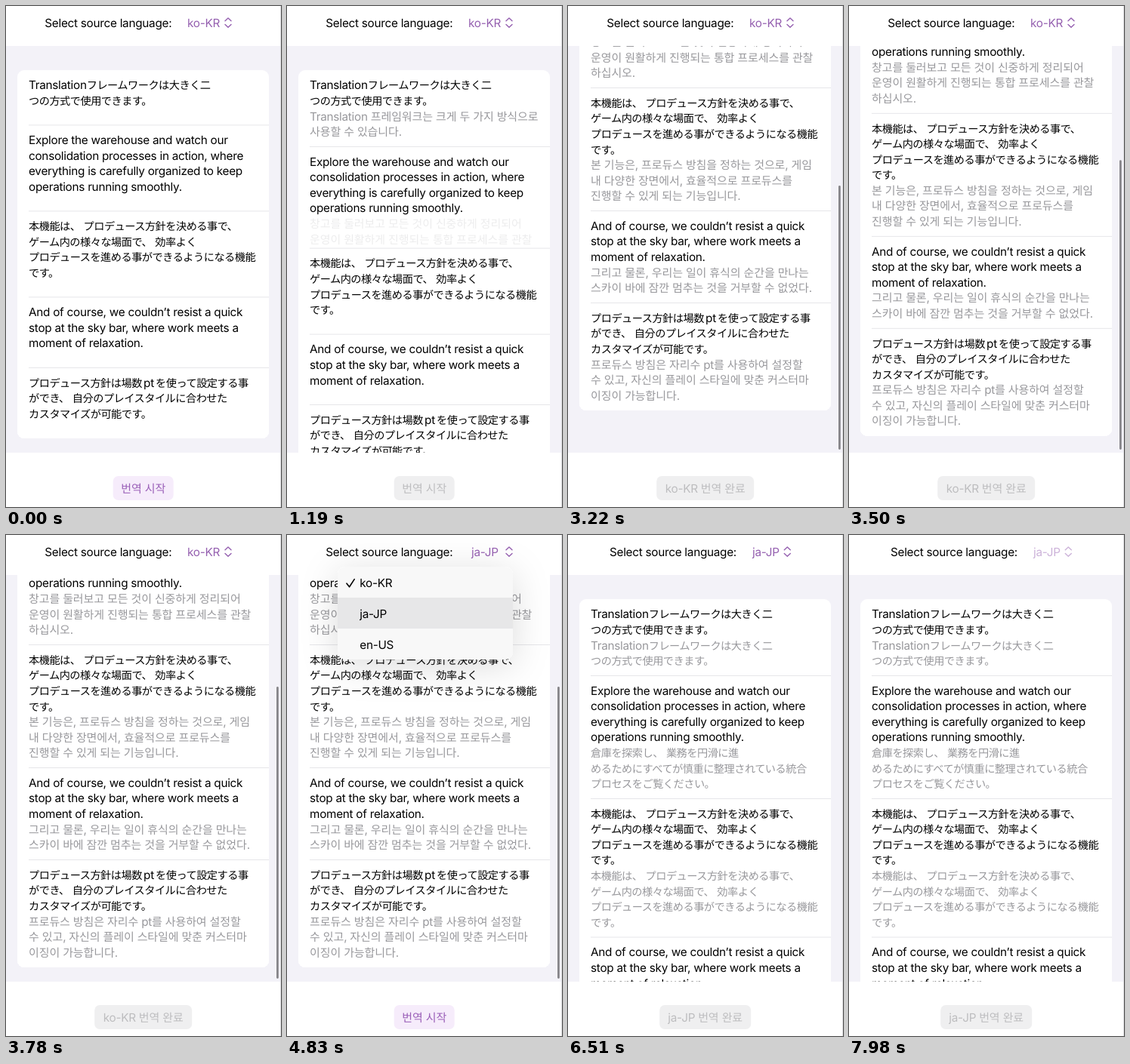
Animation of 364x664 px, one loop 8 s. Source, as an HTML page:

```html
<!DOCTYPE html>
<html lang="ko">
<head>
<meta charset="utf-8">
<title>Translation list</title>
<style>
html, body { margin: 0; width: 100%; height: 100%; overflow: hidden; background: #fff; }
svg { display: block; width: 100vw; height: 100vh; }
text { white-space: pre; text-rendering: geometricPrecision; }
.la { font: 400 15.3px Inter, sans-serif; letter-spacing: -.27px; }
.jp { font: 400 14.2px "Noto Sans CJK JP", sans-serif; letter-spacing: -.5px; }
.kr { font: 400 15px "Noto Sans CJK KR", sans-serif; letter-spacing: -.1px; }
.mid { text-anchor: middle; }
</style>
</head>
<body>
<svg id="stage" viewBox="0 0 364 664">
  <defs>
    <clipPath id="view"><rect y="53" width="364" height="539"/></clipPath>
    <clipPath id="round"><rect id="mask" x="15" width="333" rx="9"/></clipPath>
    <filter id="shade" x="-50%" y="-80%" width="200%" height="260%">
      <feDropShadow dx="0" dy="8" stdDeviation="24" flood-color="#000" flood-opacity=".14"/>
    </filter>
  </defs>
  <rect width="364" height="664" fill="#fff"/>
  <g clip-path="url(#view)">
    <rect y="53" width="364" height="539" fill="#f3f2f8"/>
    <g id="card"><g id="rows" clip-path="url(#round)"></g></g>
    <rect id="bar" x="358" width="2.8" rx="1.4" fill="#000"/>
  </g>
  <g id="button"></g>
  <rect x="363" width="1" height="664" fill="#dcdcde"/>
  <g id="menu"></g>
  <g id="head"></g>
</svg>
<script>
const LINE = 20.55, PAD = 19.2, GAP = 12.6, TOP = 85, END = 573;
const PURPLE = '#9560b0', GREY = '#98989c';
const $ = id => document.getElementById(id);

function el(parent, tag, attrs = {}) {
  const node = document.createElementNS('http://www.w3.org/2000/svg', tag);
  for (const k in attrs) node.setAttribute(k, attrs[k]);
  parent.append(node);
  return node;
}

// One text line, split into runs by script; "|" is a small gap.
function label(parent, x, y, str, fill, cls = '') {
  const node = el(parent, 'text', { x, y, fill, class: cls });
  let dx = 0;
  for (const run of str.match(/\||[ -{}~’]+|[가-힣]+|[^ -~’가-힣]+/g)) {
    if (run === '|') { dx = 2.2; continue; }
    const kind = /[ -~’]/.test(run) ? 'la' : /[가-힣]/.test(run) ? 'kr' : 'jp';
    const span = el(node, 'tspan', { class: kind });
    if (dx) span.setAttribute('dx', dx);
    span.textContent = run;
    dx = 0;
  }
  return node;
}

const clamp = x => Math.min(1, Math.max(0, x));
const ramp = (t, a, b) => clamp((t - a) / (b - a));
const smooth = (t, a, b) => { const p = ramp(t, a, b); return p * p * (3 - 2 * p); };
const mix = (a, b, p) => a + (b - a) * p;
const show = (node, on) => node.setAttribute('opacity', +on);

const intro = ['Translationフレームワークは大きく二', 'つの方式で使用できます。'];
const feature = [
  '本機能は、 プロデュース方針を決める事で、', 'ゲーム内の様々な場面で、 効率よく',
  'プロデュースを進める事ができるようになる機能', 'です。'];
const policy = [
  'プロデュース方針は場数|pt|を使って設定する事', 'ができ、 自分のプレイスタイルに合わせた',
  'カスタマイズが可能です。'];

// ko, ja: start and end of each reveal
const items = [
  { src: intro,
    kor: ['Translation 프레임워크는 크게 두 가지 방식으로', '사용할 수 있습니다.'],
    jpn: intro, ko: [690, 1010], ja: [6050, 6280] },
  { src: ['Explore the warehouse and watch our', 'consolidation processes in action, where',
      'everything is carefully organized to keep', 'operations running smoothly.'],
    kor: ['창고를 둘러보고 모든 것이 신중하게 정리되어', '운영이 원활하게 진행되는 통합 프로세스를 관찰', '하십시오.'],
    jpn: ['倉庫を探索し、 業務を円滑に進', 'めるためにすべてが慎重に整理されている統合', 'プロセスをご覧ください。'],
    ko: [1020, 1400], ja: [6110, 6350] },
  { src: feature,
    kor: ['본 기능은, 프로듀스 방침을 정하는 것으로, 게임', '내 다양한 장면에서, 효율적으로 프로듀스를', '진행할 수 있게 되는 기능입니다.'],
    jpn: feature, ko: [1440, 1800], ja: [6180, 6500] },
  { src: ['And of course, we couldn’t resist a quick', 'stop at the sky bar, where work meets a', 'moment of relaxation.'],
    kor: ['그리고 물론, 우리는 일이 휴식의 순간을 만나는', '스카이 바에 잠깐 멈추는 것을 거부할 수 없었다.'],
    jpn: ['もちろん、 仕事と休息が出会う', 'スカイバーにも立ち寄りました。'],
    ko: [1780, 2230], ja: [6240, 6500] },
  { src: policy,
    kor: ['프로듀스 방침은 자리수 pt를 사용하여 설정할', '수 있고, 자신의 플레이 스타일에 맞춘 커스터마', '이징이 가능합니다.'],
    jpn: policy, ko: [1900, 2240], ja: [6260, 6500] }
];

function block(parent, lines, first, fill) {
  const g = el(parent, 'g');
  lines.forEach((s, i) => label(g, 30, 25.4 + (first + i) * LINE, s, fill));
  return g;
}

items.forEach((it, i) => {
  it.g = el($('rows'), 'g');
  it.back = el(it.g, 'rect', { x: 15, width: 333, height: 900, fill: '#fff' });
  if (i) el(it.g, 'rect', { x: 30, y: -.4, width: 318, height: .8, fill: '#e0e0e4' });
  const n = it.src.length;
  block(it.g, it.src, 0, '#000');
  it.korText = block(it.g, it.kor, n, GREY);
  it.jpnText = block(it.g, it.jpn, n, GREY);
});

// Bottom button in its four looks
function button(str, w, fill, ink) {
  const g = el($('button'), 'g');
  el(g, 'rect', { x: 181.7 - w / 2, y: 623, width: w, height: 32, rx: 7, fill });
  label(g, 181.7, 644.6, str, ink, 'mid');
  return g;
}
const buttons = {
  ready: button('번역 시작', 80, '#f6ecfb', '#9a5fb8'),
  busy: button('번역 시작', 80, '#efeff0', '#bdbdbf'),
  ko: button('ko-KR 번역 완료', 129, '#efeff0', '#bdbdbf'),
  ja: button('ja-JP 번역 완료', 121, '#efeff0', '#bdbdbf')
};

// Header
const title = el($('head'), 'g');
label(title, 51.3, 27.8, 'Select source language:', '#000');
const picker = el($('head'), 'g');
const pickKo = label(picker, 240, 27.8, 'ko-KR', PURPLE);
const pickJa = label(picker, 244, 27.8, 'ja-JP', PURPLE);
const arrows = el(picker, 'path', {
  d: 'M290 19.8l4-3.8 4 3.8M290 24.4l4 3.8 4-3.8', fill: 'none', stroke: PURPLE,
  'stroke-width': 1.4, 'stroke-linecap': 'round', 'stroke-linejoin': 'round'
});

// Pop-up menu
const menu = $('menu');
el(menu, 'rect', { x: 67, y: 42, width: 232, height: 123, rx: 11, fill: '#f8f8f8', filter: 'url(#shade)' });
const picked = el(menu, 'rect', { x: 67, y: 83, width: 232, height: 41, fill: '#e7e7e8' });
['ko-KR', 'ja-JP', 'en-US'].forEach((s, i) => label(menu, 96.3, 69 + i * 41, s, '#000'));
el(menu, 'path', {
  d: 'M79 64.2l3.6 4.6 6.6-10.2', fill: 'none', stroke: '#000',
  'stroke-width': 1.6, 'stroke-linecap': 'round', 'stroke-linejoin': 'round'
});

function scrollAt(t, max) {
  if (t < 2900 || t > 6060) return 0;
  if (t < 3220) {
    const p = ramp(t, 2900, 3220);
    return (max + 37) * (1 - (1 - p) ** 2);
  }
  const s = max + 37 * Math.exp(-(t - 3220) / 115);
  return s - max < .3 ? max : s;
}

function drawList(t) {
  const clear = 1 - smooth(t, 5850, 6050);
  let y = TOP;
  for (const it of items) {
    const k = smooth(t, ...it.ko) * clear, j = smooth(t, ...it.ja);
    it.g.setAttribute('transform', `translate(0 ${y})`);
    show(it.korText, k * k);
    show(it.jpnText, j * j);
    y += PAD + LINE * (it.src.length + it.kor.length * k + it.jpn.length * j) + GAP * (1 - k - j);
  }
  $('mask').setAttribute('y', TOP);
  $('mask').setAttribute('height', y - TOP);

  const max = Math.max(0, y - END), s = scrollAt(t, max);
  $('card').setAttribute('transform', `translate(0 ${-s})`);
  const top = 55 + 146 * Math.min(1, max ? s / max : 0) + Math.max(0, s - max);
  const len = 387 - Math.max(0, s - max);
  $('bar').setAttribute('y', top);
  $('bar').setAttribute('height', len);
  show($('bar'), .45 * ramp(t, 2900, 2970) * (1 - ramp(t, 4850, 5040)));
}

function drawButton(t) {
  const on = t < 630 ? 'ready' : t < 2170 ? 'busy' : t < 4760 ? 'ko'
    : t < 5740 ? 'ready' : t < 6440 ? 'busy' : 'ja';
  for (const k in buttons) show(buttons[k], k === on);
}

function drawHead(t) {
  const ja = t >= 4800, p = smooth(t, 4850, 5020);
  show(pickKo, !ja);
  show(pickJa, ja);
  title.setAttribute('transform', `translate(${3.7 * p} 0)`);
  arrows.setAttribute('transform', `translate(${-3.7 * p} 0)`);
  const dim = ramp(t, 3880, 3920) * (1 - ramp(t, 4060, 4240)) + ramp(t, 7870, 7970);
  show(picker, 1 - .52 * dim);
}

function drawMenu(t) {
  const p = ramp(t, 4020, 4480), out = smooth(t, 4835, 5040);
  const grow = 1 + 1.9 * (p - 1) ** 3 + .9 * (p - 1) ** 2;
  const size = mix(.15, 1, grow) * mix(1, .45, out);
  menu.setAttribute('transform', `translate(262 38) scale(${size}) translate(-262 -38)`);
  show(menu, ramp(t, 4020, 4180) * (1 - out));
  show(picked, t >= 4690);
}

function draw(now) {
  const t = now % 8000;
  drawList(t);
  drawButton(t);
  drawHead(t);
  drawMenu(t);
}

let start;
function tick(now) {
  start ??= now;
  draw(now - start);
  requestAnimationFrame(tick);
}
draw(0);
requestAnimationFrame(tick);
</script>
</body>
</html>
```
